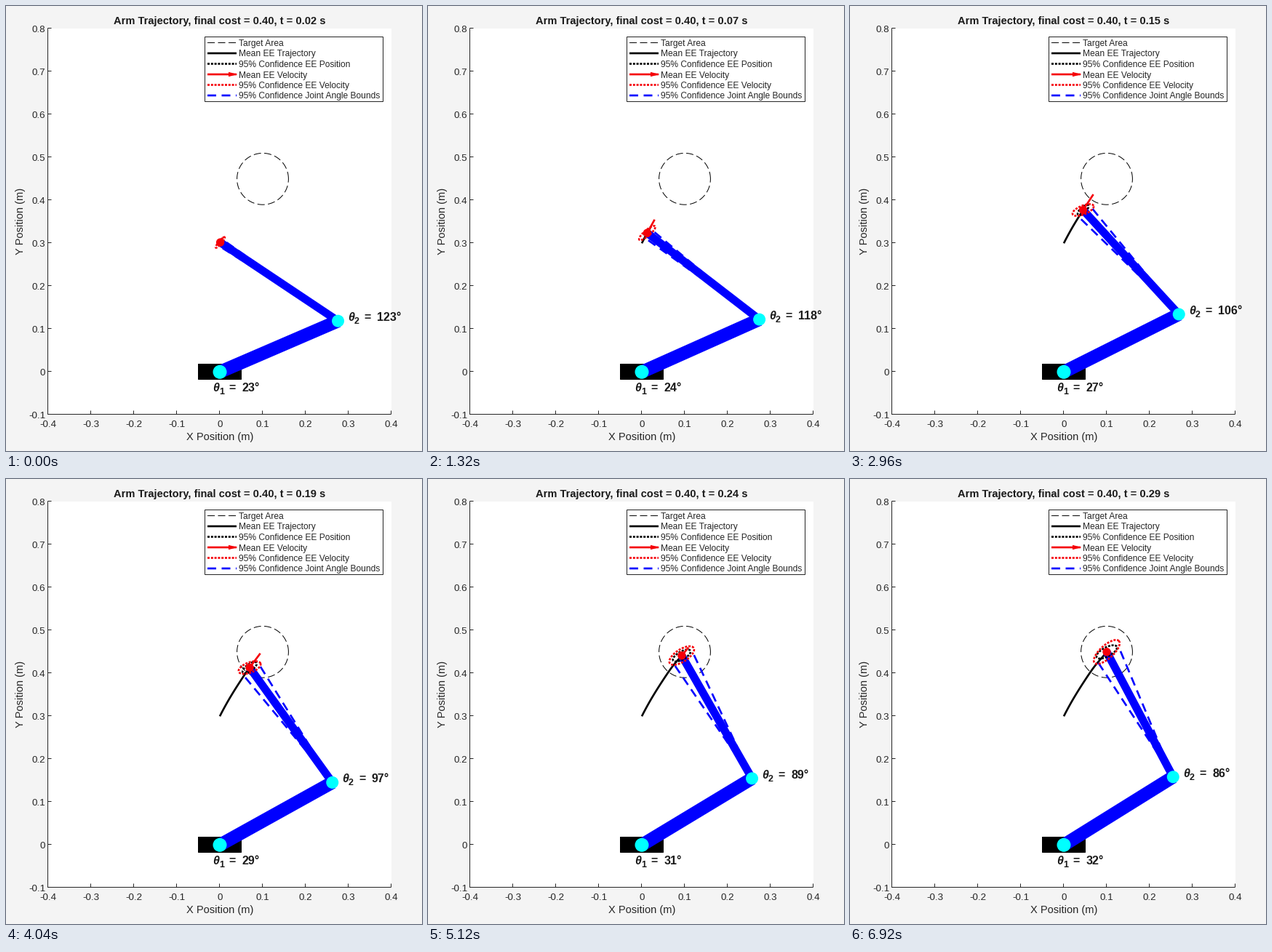
A matplotlib script for the animation above (8 s loop, 572 px wide and 612 px high).

```python
import numpy as np
import matplotlib.pyplot as plt
from matplotlib.animation import FuncAnimation
from matplotlib.patches import Circle, Polygon, Rectangle

W, H = 572, 612
PT = 0.72                         # points per pixel at 100 dpi
SCALE, X0, Y0 = 590, 294, 503.3   # metres to pixels
L1, L2 = 0.30, 0.33
DT = 0.3 / 31
INK, BLUE, RED = "#262626", "#0000ff", "#f50008"

plt.rcParams.update({
    "font.family": "Liberation Sans",
    "lines.scale_dashes": False,
    "lines.dash_capstyle": "butt",
    "lines.solid_capstyle": "butt",
    "path.snap": False,
    "toolbar": "None",
})

fig = plt.figure(figsize=(W / 100, H / 100), dpi=100, facecolor="#f4f4f4")
ax = fig.add_axes([0, 0, 1, 1])
ax.set_xlim(0, W)
ax.set_ylim(H, 0)
ax.axis("off")


def to_px(x, y):
    return X0 + SCALE * np.asarray(x), Y0 - SCALE * np.asarray(y)


def line(xs=(), ys=(), color="k", width=2.67, dash=None, z=2):
    style = (0, [d * PT for d in dash]) if dash else "-"
    return ax.plot(xs, ys, color=color, lw=width * PT, ls=style, zorder=z)[0]


def text(x, y, s, size, color=INK, z=10, va="baseline", **kw):
    return ax.text(x, y, s, fontsize=size * PT, color=color, zorder=z, va=va, **kw)


def disc(r, color, z):
    return ax.add_patch(Circle(to_px(0, 0), r, fc=color, ec="none", zorder=z))


THIN, DOTS, DASHES = (10, 4.5), (3, 1.8), (12, 7.5)


# ---- axes ----
def draw_axes():
    ax.add_patch(Rectangle((57, 31), 473, 531, fc="w", ec="none", zorder=0))
    line([57.5, 57.5, 529.5], [30.5, 561.5, 561.5], INK, 1, z=1)
    for i in range(9):
        x = 57.5 + 59 * i
        line([x, x], [561.5, 556.5], INK, 1, z=1)
        text(x + 0.3, 579.3, f"{(i - 4) / 10:g}", 13.33, ha="center")
    for i in range(10):
        y = 561.5 - 59 * i
        line([57.5, 62.5], [y, y], INK, 1, z=1)
        text(54, y + 5.7, f"{(i - 1) / 10:g}", 13.33, ha="right")
    text(X0, 597, "X Position (m)", 14.67, ha="center")
    text(20.5, 296, "Y Position (m)", 14.67, ha="center", va="center", rotation=90)


def draw_legend():
    ax.add_patch(Rectangle((273.5, 42.5), 245, 89, fc="w", ec=INK, lw=PT, zorder=8))
    rows = [
        ("Target Area", "k", 1, THIN),
        ("Mean EE Trajectory", "k", 2.67, None),
        ("95% Confidence EE Position", "k", 2.67, DOTS),
        ("Mean EE Velocity", RED, 2.67, None),
        ("95% Confidence EE Velocity", RED, 2.67, DOTS),
        ("95% Confidence Joint Angle Bounds", BLUE, 2.67, DASHES),
    ]
    for i, (name, color, width, dash) in enumerate(rows):
        y = 50.5 + 14.5 * i
        line([277, 317], [y, y], color, width, dash, z=9)
        text(320, y + 4.5, name, 12)
    y = 50.5 + 14.5 * 3
    ax.add_patch(Polygon([(306, y - 3.2), (318.5, y), (306, y + 3.2)],
                         fc=RED, ec="none", zorder=9))


# ---- motion ----
KNOTS = DT * np.array([0, 2, 4, 10, 15, 20, 25, 30, 31])
HAND = np.array([(0, .3), (.001, .302), (.0043, .3085), (.0235, .343),
                 (.045, .3775), (.0695, .4135), (.093, .4415), (.1, .45), (.1, .45)])
SLOPES = np.gradient(HAND, KNOTS, axis=0)
# velocity ellipse: tilt in degrees, semi-axes in pixels
VEL_T = KNOTS[1:8]
VEL = np.array([(50, 9.5, 2), (48, 13.5, 2.5), (33, 15, 5.5), (22, 15.5, 6),
                (21, 16, 7), (33, 19.5, 8.5), (42, 22.5, 9)])


def hand_at(t):
    """Cubic Hermite path of the end effector and its velocity."""
    k = int(np.clip(np.searchsorted(KNOTS, t, "right") - 1, 0, len(KNOTS) - 2))
    h = KNOTS[k + 1] - KNOTS[k]
    u = (t - KNOTS[k]) / h
    p, q, m, n = HAND[k], HAND[k + 1], h * SLOPES[k], h * SLOPES[k + 1]
    a, b = 2 * (p - q) + m + n, 3 * (q - p) - 2 * m - n
    return p + u * (m + u * (b + u * a)), (m + u * (2 * b + 3 * u * a)) / h


def joints(p):
    """Inverse kinematics of the two-link arm."""
    x, y = p
    t2 = np.arccos((x * x + y * y - L1 ** 2 - L2 ** 2) / (2 * L1 * L2))
    t1 = np.arctan2(y, x) - np.arctan2(L2 * np.sin(t2), L1 + L2 * np.cos(t2))
    return t1, t2


def ellipse(cx, cy, a, b, tilt):
    s = np.linspace(0, 2 * np.pi, 90)
    u, v = a * np.cos(s), b * np.sin(s)
    c, d = np.cos(tilt), np.sin(tilt)
    return cx + u * c - v * d, cy - u * d - v * c


class AngleLabel:
    def __init__(self, index):
        bold = dict(weight="bold", color="#1a1a1a")
        self.parts = [
            (0, 0, text(0, 0, "θ", 16, style="italic", **bold)),
            (8.8, 4, text(0, 0, str(index), 12.5, **bold)),
            (22.7, 0, text(0, 0, "=", 16, **bold)),
            (40.3, 0, text(0, 0, "", 16, **bold)),
        ]

    def set(self, x, y, angle):
        for dx, dy, part in self.parts:
            part.set_position((x + dx, y + dy))
        self.parts[-1][2].set_text(f"{np.degrees(angle):.0f}°")


draw_axes()
draw_legend()
title = text(X0, 25, "", 14.67, "#1a1a1a", ha="center", weight="bold")
line(*ellipse(*to_px(.1, .45), 35.4, 35.4, 0), width=1, dash=THIN, z=1)
ax.add_patch(Rectangle((264.5, 492.5), 59, 21, fc="k", ec="k", lw=PT, zorder=2))
trail = line(z=2)
upper = line(color=BLUE, width=18, z=3)
fore = line(color=BLUE, width=11, z=3)
bounds = [line(color=BLUE, dash=DASHES, z=3) for _ in range(2)]
pos_ring = line(dash=DOTS, z=4)
vel_ring = line(color=RED, dash=DOTS, z=5)
arrow = line(color=RED, z=5)
disc(9.5, "cyan", 6)
elbow = disc(8.5, "cyan", 6)
tip = disc(5.7, RED, 6)
label1, label2 = AngleLabel(1), AngleLabel(2)


def update(i):
    step = int(np.clip(2 + (i * 40 - 40) // 220, 2, 30))
    t = step * DT
    p, v = hand_at(t)
    t1, t2 = joints(p)
    ex, ey = to_px(L1 * np.cos(t1), L1 * np.sin(t1))
    hx, hy = to_px(*p)

    title.set_text(f"Arm Trajectory, final cost = 0.40, t = {t:.2f} s")
    path = np.array([hand_at(s)[0] for s in np.linspace(0, t, 2 * step + 1)])
    trail.set_data(*to_px(*path.T))
    upper.set_data([X0, ex], [Y0, ey])
    fore.set_data([ex, hx], [ey, hy])

    spread = np.radians(1.2 + 14 * t)
    for sign, bound in zip((-1, 1), bounds):
        a = t1 + t2 + sign * spread
        bound.set_data([ex, ex + SCALE * L2 * np.cos(a)],
                       [ey, ey - SCALE * L2 * np.sin(a)])

    major = 0.87 * SCALE * L2 * spread
    pos_ring.set_data(*ellipse(hx, hy, major, 0.4 * major, t1 + t2 - np.pi / 2))
    tilt, a, b = (np.interp(t, VEL_T, col) for col in VEL.T)
    vel_ring.set_data(*ellipse(hx, hy, a, b, np.radians(tilt)))
    vx, vy = to_px(*(p + 0.05 * v))
    arrow.set_data([hx, vx], [hy, vy])

    elbow.center = ex, ey
    tip.center = hx, hy
    label1.set(284, 530.2, t1)
    label2.set(ex + 13.5, ey, t2)


anim = FuncAnimation(fig, update, frames=200, interval=40, repeat=True,
                     repeat_delay=0, blit=False)
plt.show()
```
